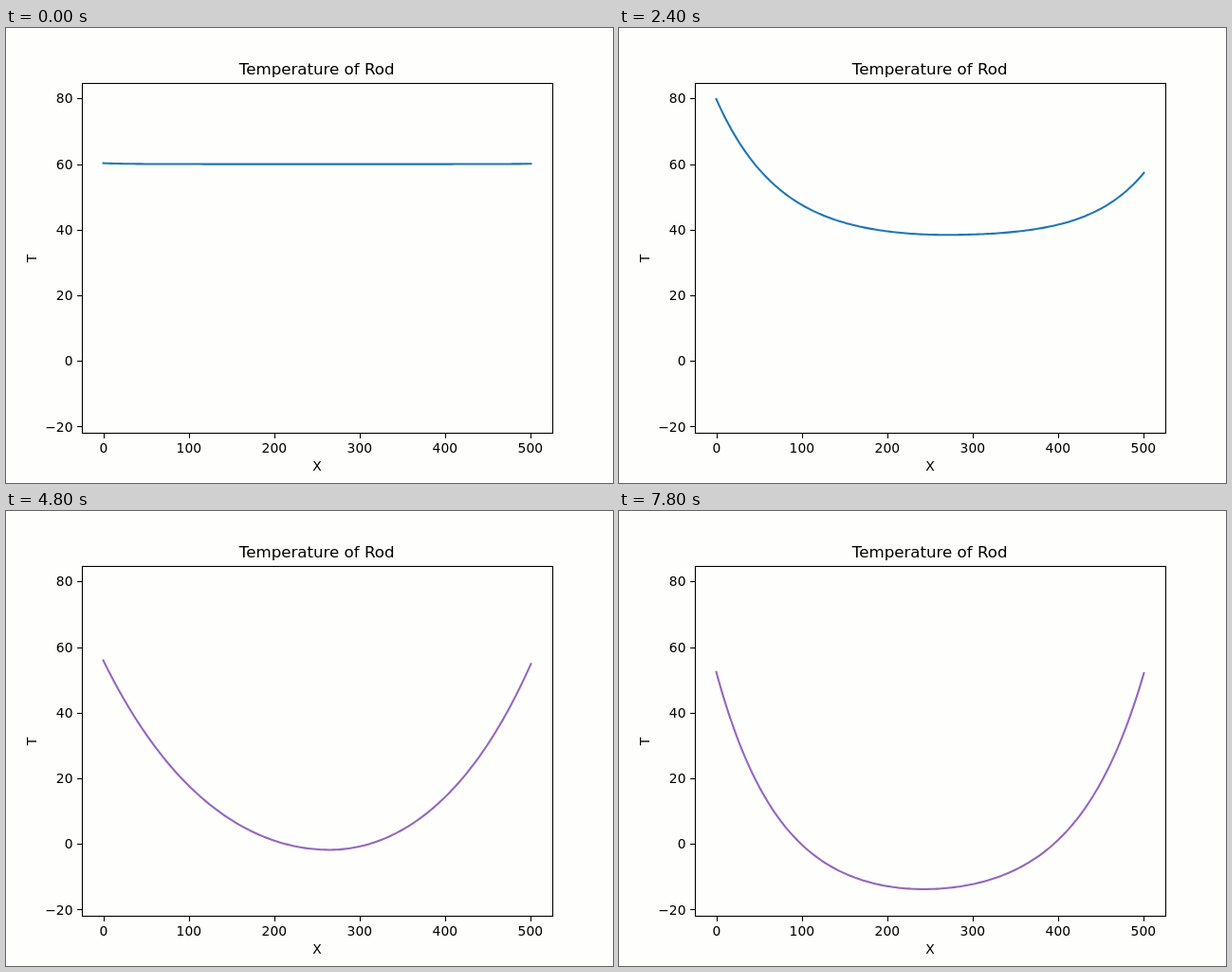
An HTML page for the animation above (8000 ms loop, 640x480 px).

```html
<!DOCTYPE html>
<html lang="en">
<head>
<meta charset="utf-8">
<title>Temperature of Rod</title>
<style>
  html, body { margin: 0; width: 100%; height: 100%; overflow: hidden; background: #fefefd; }
  svg { display: block; width: 640px; height: 480px; }
  text { font: 13.89px "DejaVu Sans", sans-serif; text-anchor: middle; }
  .title { font-size: 16.67px; }
  .right { text-anchor: end; }
  .axis { fill: none; stroke: #000; stroke-width: 1.1; }
  #curve { fill: none; stroke-width: 2.08; stroke-linejoin: round; stroke-linecap: square; }
</style>
</head>
<body>
<svg viewBox="0 0 640 480">
  <path id="curve"/>
  <rect class="axis" x="80.5" y="58.5" width="496" height="369"/>
  <g id="ticks"></g>
  <text class="title" x="327.7" y="49">Temperature of Rod</text>
  <text x="328" y="467">X</text>
  <text transform="translate(32 243) rotate(-90)">T</text>
</svg>
<script>
const STEP = 200, STEPS = 40, LENGTH = 501;
const xPixel = x => 102.55 + x * 0.9;
const yPixel = t => 351.2 - t * 3.46;
const snap = v => Math.round(v) + 0.5;

// Key points: seconds, lowest temperature, sharpness of the rise towards the ends.
const keys = [
  [0, 60, 9], [1.6, 47.5, 4.65], [3.2, 24.6, 3.25], [4, 2.8, 3.35],
  [4.8, -1.8, 1.65], [6.2, 0.5, 0.7], [7.8, -13.8, 3.25]
];

// Hermite curve through one column of the keys, with tangents from parabolas.
function ease(column, time) {
  const last = keys.length - 1;
  const at = i => keys[i][0], value = i => keys[i][column];
  const slope = i => (value(i + 1) - value(i)) / (at(i + 1) - at(i));
  const tangent = i => {
    const m = Math.min(Math.max(i, 1), last - 1);
    const bend = (slope(m) - slope(m - 1)) / (at(m + 1) - at(m - 1));
    return slope(m - 1) + bend * (2 * at(i) - at(m - 1) - at(m));
  };
  let i = 0;
  while (i < last - 1 && time > at(i + 1)) i++;
  const h = at(i + 1) - at(i), u = (time - at(i)) / h, v = 1 - u;
  return value(i) * v * v * (1 + 2 * u) + value(i + 1) * u * u * (3 - 2 * u)
    + h * u * v * (tangent(i) * v - tangent(i + 1) * u);
}

// Temperature along the rod: a cosh arc on each side of the coldest point.
function profile(step) {
  const floor = ease(1, step * STEP / 1000);
  const sharpness = ease(2, step * STEP / 1000);
  const coldest = 258 + 16 * Math.sin(0.153 * (step - 6.5));

  // The left end swings around 60 after a soft start.
  const phase = 0.168 * (step - 4 * (1 - Math.exp(-step / 3)));
  const leftRise = 60.3 + 20 * Math.sin(phase) - floor;

  // The right end loses heat in proportion to its gradient.
  const gradient = sharpness / Math.tanh(sharpness / 2) / (LENGTH - coldest);
  const rightRise = (60.15 - floor) / (1 + 9 * gradient);

  const arc = u => (Math.cosh(sharpness * u) - 1) / (Math.cosh(sharpness) - 1);
  return x => floor + (x < coldest
    ? leftRise * arc(1 - x / coldest)
    : rightRise * arc((x - coldest) / (LENGTH - coldest)));
}

const colors = ["#e377c2", "#bcbd22", "#1f77b4", "#2ca02c", "#9467bd"];
const curve = document.getElementById("curve");
let shown = -1;

function draw(now) {
  const step = Math.floor(now / STEP) % STEPS;
  if (step !== shown) {
    shown = step;
    const temperature = profile(step);
    const points = [];
    for (let x = 0; x <= LENGTH; x += 3) {
      points.push(xPixel(x).toFixed(2) + " " + yPixel(temperature(x)).toFixed(2));
    }
    curve.setAttribute("d", "M" + points.join("L"));
    curve.setAttribute("stroke", step ? colors[step % 5] : colors[2]);
  }
  requestAnimationFrame(draw);
}

let ticks = "";
for (let x = 0; x <= 500; x += 100) {
  ticks += `<path class="axis" d="M${snap(xPixel(x))} 428v4.9"/>
    <text x="${xPixel(x) + 0.3}" y="448">${x}</text>`;
}
for (let t = -20; t <= 80; t += 20) {
  const y = snap(yPixel(t));
  ticks += `<path class="axis" d="M80 ${y}h-4.9"/>
    <text class="right" x="70.5" y="${Math.round(yPixel(t) + 5.1)}">${String(t).replace("-", "\u2212")}</text>`;
}
document.getElementById("ticks").innerHTML = ticks;
draw(0);
</script>
</body>
</html>
```
